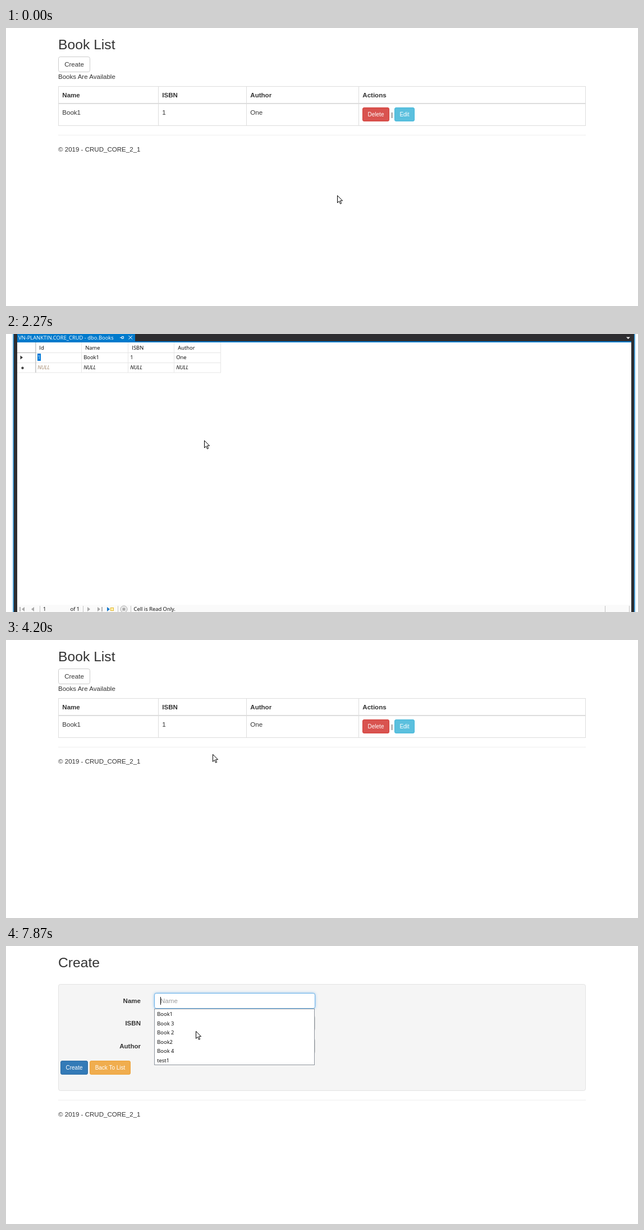
These frames come from a looping animation (1126x497 px, 8 s). An HTML page:

```html
<!DOCTYPE html>
<html lang="en">
<head>
<meta charset="utf-8">
<title>Book list</title>
<style>
  html, body { margin: 0; width: 100%; height: 100%; overflow: hidden; background: #fff; }
  svg { display: block; width: 100%; height: 100%; }
  text { white-space: pre; }
  .page text { font: 11.55px "Liberation Sans", Arial, sans-serif; fill: #333; }
  .page .title { font-size: 24.7px; }
  .page .bold { font-weight: bold; }
  .page .small { font-size: 10px; fill: #fff; }
  .page .hint { fill: #999; }
  .ui text { font: 9.4px "Open Sans", "Noto Sans", sans-serif; fill: #000; }
  .ui .light { fill: #fff; }
  .ui .null { font-style: italic; }
  .ui .faded { fill: #a08468; }
  .mid { text-anchor: middle; }
  .end { text-anchor: end; }
</style>
</head>
<body>
<svg id="stage" viewBox="0 0 1126 497" xmlns="http://www.w3.org/2000/svg"></svg>
<script>
const text = (x, y, str, cls = "") => `<text x="${x}" y="${y}" class="${cls}">${str}</text>`;
const rect = (x, y, w, h, fill, extra = "") =>
  `<rect x="${x}" y="${y}" width="${w}" height="${h}" fill="${fill}" ${extra}/>`;
const path = (d, fill, extra = "") => `<path d="${d}" fill="${fill}" ${extra}/>`;
const line = (d, color, extra = "") => path(d, "none", `stroke="${color}" ${extra}`);
const box = (x, y, w, h, fill, stroke, r = 0, extra = "") =>
  rect(x + .5, y + .5, w - 1, h - 1, fill, `stroke="${stroke}" rx="${r}" ${extra}`);
const group = (id, content, cls = "") => `<g id="${id}" class="${cls}">${content}</g>`;
const smallButton = (x, y, w, label, fill, stroke) =>
  box(x, y, w, 25, fill, stroke, 2.5) + text(x + w / 2, y + 16.3, label, "small mid");
const footer = y => rect(93, y, 940, 1, "#eee") + text(93, y + 29.8, "© 2019 - CRUD_CORE_2_1");

const COLUMNS = [93, 271, 428, 628];
const SERVER = "VN-PLANKTIN.CORE_CRUD";

function listPage() {
  const headers = ["Name", "ISBN", "Author", "Actions"];
  const values = ["Book1", "1", "One"];
  return text(93, 38, "Book List", "title")
    + box(93, 51, 57, 28, "#fff", "#ccc", 3.3, 'id="createButton"')
    + text(121.5, 69, "Create", "mid")
    + text(93, 91.3, "Books Are Available")
    + line("M93 104.5H1033M93 174.5H1033M1032.5 104V175" + COLUMNS.map(x => `M${x + .5} 104V175`).join(""), "#ddd")
    + rect(93, 134, 940, 2, "#ddd")
    + headers.map((s, i) => text(COLUMNS[i] + 7.3, 123.6, s, "bold")).join("")
    + values.map((s, i) => text(COLUMNS[i] + 7.3, 155, s)).join("")
    + smallButton(635, 142, 48, "Delete", "#d9534f", "#d43f3a")
    + text(686.3, 158.5, "|")
    + smallButton(692, 142, 36, "Edit", "#5bc0de", "#46b8da")
    + footer(191);
}

function formPage() {
  const field = (label, i) => {
    const y = 84 + Math.round(i * 40.4);
    return text(240, y + 18, label, "bold end")
      + box(264, y, 287, 28, "#fff", "#ccc", 3.3)
      + (i ? "" : box(264, y, 287, 28, "#fff", "#66afe9", 3.3, 'id="focusRing" filter="url(#glow)"'))
      + text(275, y + 18, label, "hint");
  };
  return text(93, 38, "Create", "title")
    + box(93, 68, 940, 191, "#f5f5f5", "#e3e3e3", 3.3)
    + ["Name", "ISBN", "Author"].map(field).join("")
    + rect(275, 91, 1, 14, "#000", 'id="fieldCaret"')
    + smallButton(97, 205, 49, "Create", "#337ab7", "#2e6da4")
    + smallButton(149, 205, 73, "Back To List", "#f0ad4e", "#eea236")
    + footer(275);
}

function suggestions() {
  const items = ["Book1", "Book 3", "Book 2", "Book2", "Book 4", "test1"];
  return box(264, 112, 286, 101, "#fff", "#8d949c")
    + items.map((s, i) => text(269.3, 125.3 + i * 16.45, s)).join("");
}

function taskPreview() {
  const tinyText = (x, y, w, color, dash) => line(`M${x} ${y}h${w}`, color, `stroke-dasharray="${dash}" opacity=".7"`);
  return rect(287, 376, 356, 130, "#2b2b2b", 'filter="url(#shadow)"')
    + rect(465, 376, 178, 121, "#505050", 'id="previewHover"')
    + '<circle cx="300" cy="388.5" r="6" fill="#e9c53c"/><circle cx="478" cy="388.5" r="6" fill="#e9c53c"/>'
    + text(313, 392.2, SERVER + " - d...", "light") + text(491, 392.2, "Solution1", "light")
    + box(294, 403, 163, 87, "#2d2d30", "#555")
    + rect(295, 487, 161, 2.5, "#0a7acc")
    + tinyText(296, 407.5, 52, "#aaa", "4 2") + tinyText(417, 405.5, 38, "#888", "3 2")
    + tinyText(296, 411.5, 78, "#999", "1 3 3 2") + tinyText(394, 411.5, 32, "#bbb", "3 1")
    + rect(296, 414, 1, 8, "#aaa")
    + rect(472, 405, 164, 81, "#fff") + rect(472, 405, 164, 7, "#2d2d30") + rect(472, 409, 32, 3, "#0a7acc")
    + tinyText(624, 407.5, 11, "#ccc", "2 3")
    + [414.5, 417.5, 420].map(y => tinyText(477, y, 45, "#777", "4 9")).join("")
    + tinyText(474, 484, 42, "#999", "2 3")
    + line("M625 384l10 10M635 384l-10 10", "#fff", 'id="previewClose" stroke-width="1.1"');
}

function databaseWindow() {
  const edges = [53, 135, 218, 300, 383];
  const headers = ["Id", "Name", "ISBN", "Author"];
  const cells = ["1", "Book1", "1", "One"];
  const triangle = (x, dir) => `M${x} 488l${5 * dir} 4l${-5 * dir} 4z`;
  const frame = rect(10.5, -5, 1112, 510, "#d9ecf8") + rect(12, -5, 1109, 510, "#8cc4e8")
    + rect(13, -5, 1107, 510, "#2083c4") + rect(14, -5, 1105, 510, "#2d2d30")
    + rect(20, 13, 1094, 2, "#007acc") + rect(20, 15, 1094, 482, "#fff")
    + rect(20, 0, 210, 14, "#007acc") + text(22, 10, SERVER + " - dbo.Books", "light")
    + line("M203 6.5h3M206.5 4v5M206 4.5h3.5v3.5h-3.5M218.5 3l6.5 6.5M225 3l-6.5 6.5", "#fff")
    + path("M1105 5.5h7l-3.5 3.5z", "#f1f1f1");
  const grid = line("M20 33.5H383M20 51.5H383M20 69H383" + edges.map(x => `M${x - .5} 15V69`).join(""), "#e6e6e6")
    + line("M53 15V69M20 33.5H53", "#a5a5a5", 'stroke-width=".8"')
    + path("M25.5 38.5l4.5 3.5l-4.5 3.5z", "#333") + '<circle cx="29.5" cy="60.8" r="2.2" fill="#444"/>'
    + rect(56, 35, 6, 13, "#0078d7")
    + headers.map((s, i) => text(edges[i] + 6.3, 28, s)).join("")
    + cells.map((s, i) => text(edges[i] + 3.2, 45.4, s, i ? "" : "light")).join("")
    + cells.map((s, i) => text(edges[i] + 3.2, 63.4, "NULL", i ? "null" : "null faded")).join("")
    + rect(62, 35, 1, 13, "#000", 'id="cellCaret"');
  const navigator = rect(20, 484, 1094, 13, "#fafafa")
    + path(triangle(33, -1) + triangle(50, -1) + triangle(145, 1) + triangle(163, 1), "#a8a8a8")
    + line("M25 488v8M171 488v8", "#a0a0a0", 'stroke-width="1.5"')
    + line("M60.5 486v11M137.5 486v11M199.5 486v11M222.5 486v11M1067.5 486v11M1110.5 486v11", "#c4c4c4")
    + path(triangle(180, 1), "#1979ca") + box(186, 489, 6, 6, "#fff3b0", "#e3b52c")
    + '<circle cx="210" cy="492" r="6" fill="#eee" stroke="#aaa"/>' + rect(207.5, 489.5, 5, 5, "#aaa")
    + text(66, 495.4, "1") + text(114.5, 495.4, "of 1");
  return frame + group("grid", grid) + navigator + group("readOnly", text(227.5, 495.4, "Cell is Read Only."));
}

function contextMenu() {
  const items = ["Execute SQL", "Cut", "Copy", "Paste", "Delete", "Pane", "Clear Results", "Properties"];
  return box(353, 190, 177, 156, "#1b1b1c", "#333337")
    + rect(355, 192, 172, 19, "#3e3e40", 'id="menuHover"')
    + items.map((s, i) => text(381, 205 + i * 19, s, "light")).join("");
}

const outline = 'stroke="#000" stroke-linejoin="round"';
const cursors =
  group("arrow", path("M.5 .5V13.5L3.5 10.6L5.6 15.4L7.6 14.5L5.5 9.8H9.6Z", "#fff", outline))
  + group("hand", path("M-1 1q1.5-2 3 0v5l6 1.5q2 .5 1.5 3l-1 5h-6l-5-6q0-2 1.500-1z", "#fff", outline))
  + group("beam", line("M-3 -7.500h2.500l.5 .5l.5-.5h2.500M0-7v14M-3 7.500h2.500l.5-.5l.5 .5h2.500", "#222"));

const stage = document.getElementById("stage");
stage.innerHTML = `<defs>
  <filter id="glow" x="-5%" y="-40%" width="110%" height="180%"><feDropShadow dx="0" dy="0" stdDeviation="2.5" flood-color="#66afe9" flood-opacity=".7"/></filter>
  <filter id="shadow"><feDropShadow dx="1" dy="1" stdDeviation="3" flood-color="#000" flood-opacity=".5"/></filter>
</defs>`
  + rect(0, 0, 1126, 497, "#fff")
  + group("list", listPage(), "page")
  + group("form", formPage(), "page")
  + group("suggest", suggestions(), "ui")
  + group("linkTip", box(-1, 480, 221, 18, "#f9f9f9", "#d4d4d4", 2)
    + group("linkUrl", text(3, 492.5, "https://localhost:44337/Books/Create"))
    + group("linkWait", text(3, 492.5, "Waiting for localhost…")), "ui")
  + group("preview", taskPreview(), "ui")
  + group("database", databaseWindow(), "ui")
  + group("menu", contextMenu(), "ui")
  + group("cursor", cursors);

const el = {};
stage.querySelectorAll("[id]").forEach(node => el[node.id] = node);
const show = (id, on) => el[id].style.display = on ? "" : "none";

const TICK = 200 / 3;
const STOPS = [
  [5, 590, 299], [7, 582, 246], [12, 480, 505], [20, 490, 505], [25, 537, 427], [28, 537, 427],
  [34, 353, 190], [38, 353, 190], [41, 368, 204], [64, 368, 204], [66, 390, 190], [69, 390, 190],
  [79, 124, 59], [91, 124, 59], [95, 342, 123], [98, 344, 98], [111, 344, 98], [118, 338, 152]
];

function cursorAt(tick) {
  const next = STOPS.findIndex(stop => stop[0] >= tick);
  if (next < 0) return STOPS.at(-1).slice(1);
  if (next === 0) return STOPS[0].slice(1);
  const [from, to] = [STOPS[next - 1], STOPS[next]];
  const u = (tick - from[0]) / (to[0] - from[0]);
  const eased = u * u * (3 - 2 * u);
  return [1, 2].map(i => Math.round(from[i] + (to[i] - from[i]) * eased));
}

function render(ms) {
  const tick = Math.floor((ms + 4) / TICK);
  const during = (start, end) => tick >= start && tick < end;
  const [x, y] = cursorAt(tick);
  const inside = (left, top, right, bottom) => x >= left && x < right && y >= top && y < bottom;
  const onForm = tick >= 87;
  const overCreate = !onForm && inside(93, 51, 150, 79);
  const overField = onForm && inside(264, 84, 551, 112);

  show("list", !onForm);
  show("form", onForm);
  el.createButton.setAttribute("fill", overCreate ? "#e6e6e6" : "#fff");
  el.createButton.setAttribute("stroke", overCreate ? "#adadad" : "#ccc");
  show("linkTip", during(80, 87));
  show("linkUrl", tick < 83);
  show("linkWait", tick >= 83);

  show("preview", during(11, 26));
  el.preview.style.opacity = tick === 11 ? .5 : 1;
  show("previewHover", tick >= 22);
  show("previewClose", tick >= 22);

  show("database", during(26, 63));
  el.database.style.opacity = tick < 61 ? 1 : tick === 61 ? .6 : .2;
  show("menu", during(36, 45));
  show("menuHover", tick >= 39);
  show("grid", tick !== 48);
  show("readOnly", !during(45, 49));
  show("cellCaret", during(28, 34) || during(36, 45) || tick >= 58);

  show("focusRing", tick >= 100);
  el.focusRing.style.opacity = Math.min(1, (tick - 99) / 3);
  show("fieldCaret", during(100, 108) || tick >= 116);
  show("suggest", tick >= 103);

  show("arrow", !overCreate && !overField);
  show("hand", overCreate);
  show("beam", overField);
  el.cursor.setAttribute("transform", `translate(${x} ${y})`);
}

const start = performance.now();
function loop() {
  render((performance.now() - start) % 8000);
  requestAnimationFrame(loop);
}
loop();
</script>
</body>
</html>
```
